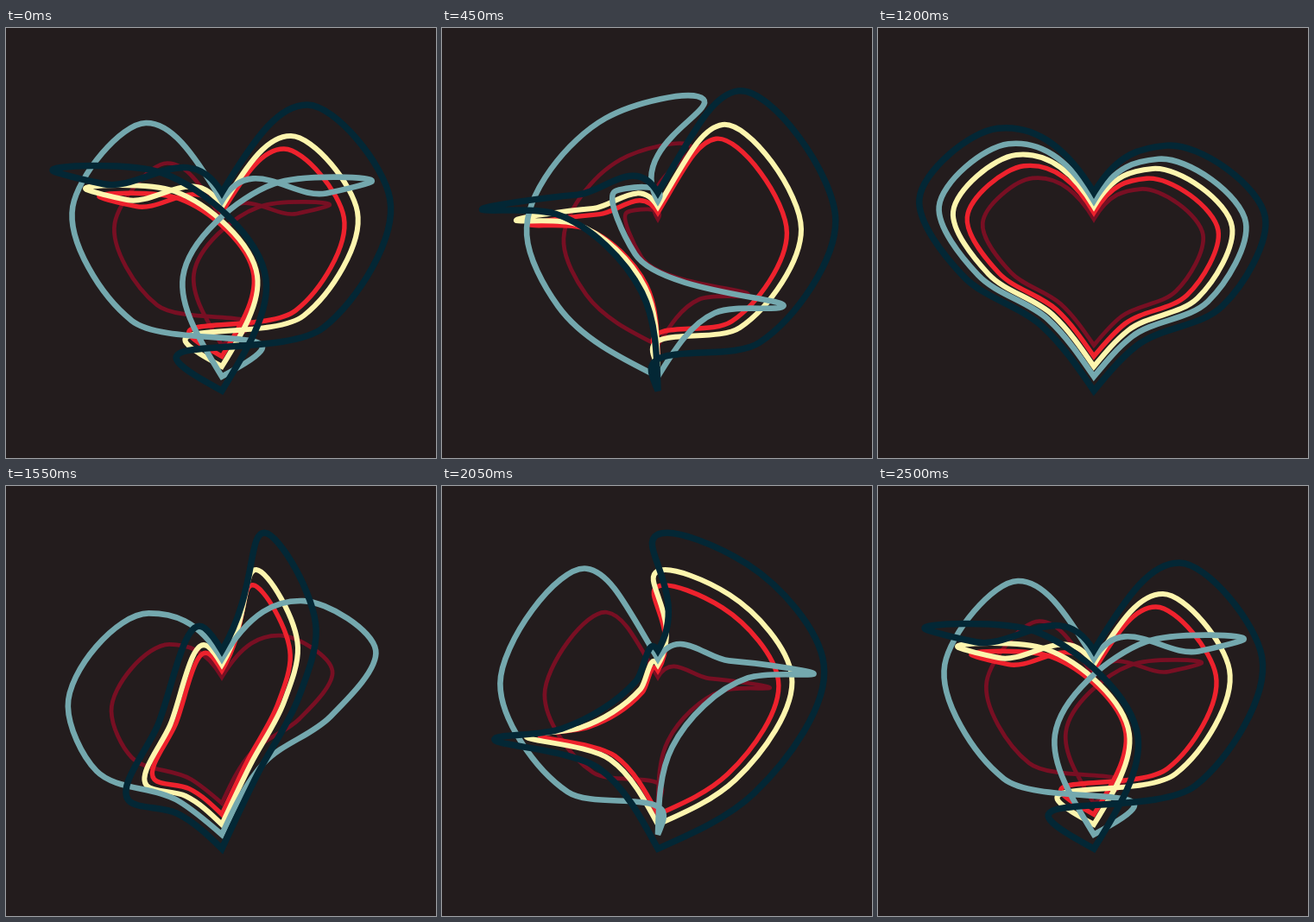
Write an HTML page with a canvas that moves like this. It is 498x498 px and loops after 2.55 s.

```html
<!DOCTYPE html>
<html lang="en">
<head>
<meta charset="utf-8">
<title>Twisting hearts</title>
<style>
html, body { margin: 0; height: 100%; overflow: hidden; background: #231c1d; }
canvas { display: block; }
</style>
</head>
<body>
<canvas id="stage" width="498" height="498"></canvas>
<script>
const ctx = document.getElementById('stage').getContext('2d');
const LOOP = 2550, CYCLE = 2500, STEP = 50;
const TOP = [0, -68], BOTTOM = [0, 117];

// Each pose: four x,y points down the left side, then four down the right side.
const looped   = [-110, -76, -157, -88, -55, -86, 41, 12,   80, -150, 157, -62, 95, 58, -41, 90];
const pinched  = [-75, -66, -164, -52, -95, -48, -15, 25,   75, -163, 166, -42, 95, 72, -6, 100];
const folded   = [-60, -105, -161, -65, -100, -28, -30, 42, 92, -140, 163, -30, 115, 55, 25, 90];
const leaning  = [-86, -129, -162, -77, -114, -7, -45, 41,  77, -116, 162, -18, 132, 50, 45, 82];
const plain    = [-90, -128, -163, -62, -122, 10, -48, 57,  68, -112, 160, -45, 120, 38, 40, 75];
const squeezed = [-16, -89, -60, 2, -87, 72, -42, 84,       40, -178, 88, -88, 72, -25, 33, 48];
const starred  = [-20, -40, -90, 5, -152, 14, -55, 42,      -1, -176, 83, -149, 155, -55, 90, 65];
const crossed  = [45, -78, 24, -12, -130, 44, -60, 50,      -48, -175, 55, -155, 138, -32, 105, 43];
const winged   = [-73, -118, -153, -103, -86, -62, -23, 5,  82, -123, 153, -41, 112, 60, 40, 95];

const mirror = pose => [...pose.slice(8), ...pose.slice(0, 8)].map((v, i) => i % 2 ? v : -v);

const forward = [[0, looped], [450, pinched], [750, folded], [950, leaning], [1200, plain],
  [1550, squeezed], [1890, crossed], [2050, starred]];
const backward = [[0, mirror(looped)], [290, mirror(starred)], [450, mirror(crossed)],
  [750, mirror(winged)], [1200, plain], [1550, mirror(leaning)], [1750, mirror(folded)],
  [2050, mirror(pinched)]];

// Drawn from back to front; size scales both outline and stroke.
const hearts = [
  { color: '#780f23', size: 0.79, keys: backward },
  { color: '#ee222d', size: 0.9, keys: forward },
  { color: '#fdf5ae', size: 1, keys: forward },
  { color: '#74a8ae', size: 1.1, keys: backward },
  { color: '#032735', size: 1.24, keys: forward },
];

// Smooth cyclic interpolation through the timed poses.
function poseAt(keys, t) {
  const n = keys.length;
  const i = keys.findLastIndex(key => key[0] <= t);
  const [a, b, c, d] = [i - 1, i, i + 1, i + 2].map(j => {
    const [time, pose] = keys[(j + n) % n];
    return { time: time + CYCLE * Math.floor(j / n), pose };
  });
  const span = c.time - b.time, u = (t - b.time) / span, v = 1 - u;
  return b.pose.map((from, k) => {
    const to = c.pose[k];
    const m0 = (to - a.pose[k]) / (c.time - a.time) * span;
    const m1 = (d.pose[k] - from) / (d.time - b.time) * span;
    return v * v * (1 + 2 * u) * from + u * u * (3 - 2 * u) * to + u * v * (v * m0 - u * m1);
  });
}

const distance = (p, q) => Math.hypot(p[0] - q[0], p[1] - q[1]) || 1e-6;

// Bezier control points of one side, from the notch to the lower tip.
function sideCurve(flat, sign) {
  const pts = [TOP];
  for (let i = 0; i < 8; i += 2) pts.push([flat[i], flat[i + 1]]);
  pts.push(BOTTOM);
  const reach = distance(TOP, pts[1]);
  const out = [TOP, [sign * 0.28 * reach, TOP[1] - 0.47 * reach]];
  for (let i = 1; i < 5; i++) {
    const [a, p, b] = pts.slice(i - 1, i + 2);
    const d = distance(a, p), e = distance(p, b);
    const m = [0, 1].map(k => ((p[k] - a[k]) / d * e + (b[k] - p[k]) / e * d) / (d + e));
    out.push(p.map((v, k) => v - m[k] * d / 3), p, p.map((v, k) => v + m[k] * e / 3));
  }
  const last = out[out.length - 1];
  out.push(last.map((v, k) => (v + BOTTOM[k]) / 2), BOTTOM);
  return out;
}

function drawHeart({ color, size, keys }, t) {
  const pose = poseAt(keys, t);
  const curve = [...sideCurve(pose.slice(8), 1), ...sideCurve(pose.slice(0, 8), -1).reverse().slice(1)];
  ctx.setTransform(size, 0, 0, size, 250, 275);
  ctx.beginPath();
  ctx.moveTo(...curve[0]);
  for (let i = 1; i < curve.length; i += 3) {
    ctx.bezierCurveTo(...curve[i], ...curve[i + 1], ...curve[i + 2]);
  }
  ctx.closePath();
  ctx.strokeStyle = color;
  ctx.lineWidth = 6;
  ctx.miterLimit = 4;
  ctx.stroke();
}

function draw() {
  const t = Math.floor(performance.now() % LOOP / STEP) * STEP;
  ctx.setTransform(1, 0, 0, 1, 0, 0);
  ctx.fillStyle = '#231c1d';
  ctx.fillRect(0, 0, 498, 498);
  hearts.forEach(heart => drawHeart(heart, t));
  requestAnimationFrame(draw);
}
draw();
</script>
</body>
</html>
```
